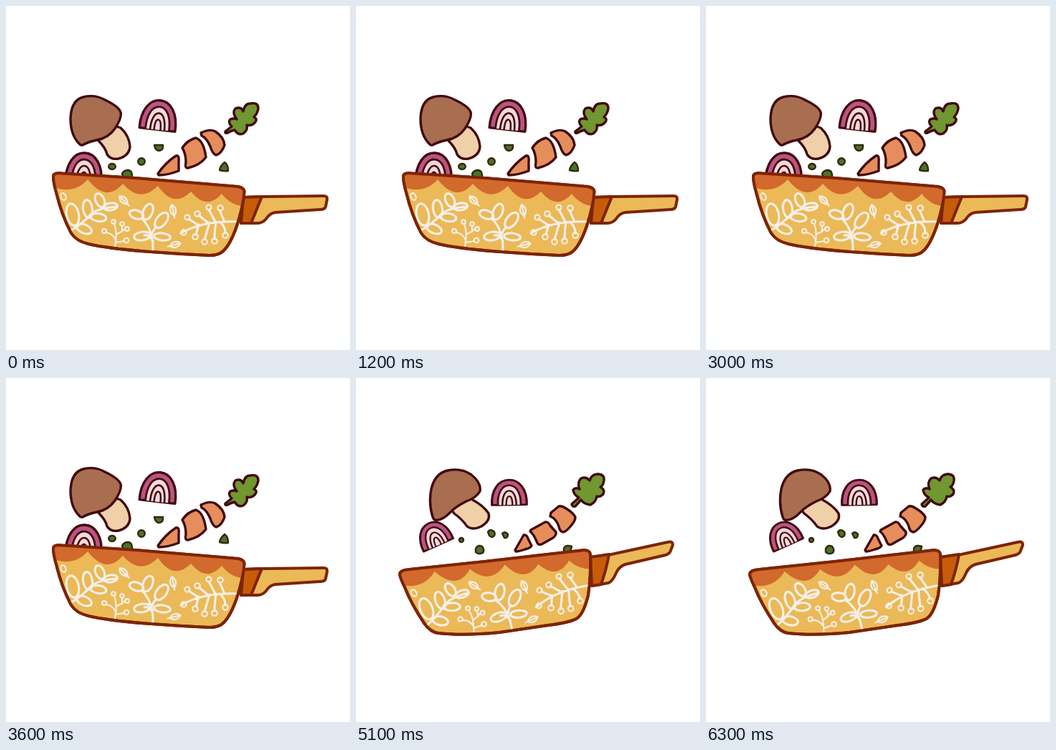
These frames come from a looping animation (480 by 480 pixels, 6.6 s). An HTML page:

```html
<!DOCTYPE html>
<html lang="en">
<head>
<meta charset="utf-8">
<title>Tossing vegetables</title>
<style>
  html, body { margin: 0; width: 100%; height: 100%; overflow: hidden; background: #fff; }
  svg { display: block; width: 100vw; height: 100vh; }
  .pose { animation: swap 600ms step-end infinite; }
  .up { animation-delay: -300ms; }
  @keyframes swap { 0% { opacity: 1; } 50%, 100% { opacity: 0; } }

  .food, .onion { stroke: #410b10; stroke-width: 3.4; stroke-linejoin: round; stroke-linecap: round; }
  .cap { fill: #a96e50; }
  .stem { fill: #efd0a9; }
  .carrot { fill: #e58e5c; }
  .leaf { fill: #709730; }
  .herb { fill: #467429; stroke: #35270f; stroke-width: 2.4; }
  .pan { fill: #ebb957; }
  .rim { fill: #d2692d; }
  .wedge { fill: #c65c09; }
  .line { fill: none; }
  .pan, .wedge, .line { stroke: #7d2407; stroke-width: 4; stroke-linejoin: round; }
  .deco { fill: none; stroke: #f5efe7; stroke-width: 3.1; stroke-linecap: round; stroke-linejoin: round; }
  .fine { stroke-width: 2.1; }
</style>
</head>
<body>
<svg viewBox="0 0 480 480" xmlns="http://www.w3.org/2000/svg">
  <defs>
    <path id="bodyDown" d="M66 238Q66 232 78 233.500L180 240L318 251.500Q332 252 332.500 259Q331 280 322 307Q313 333 303 342Q297 348 284 348Q240 346 195 342.500Q140 338 115 332Q98 328 91 317Q78 293 70 260Q66 246 66 238Z"/>
    <path id="bodyUp" d="M61 274Q61 268 75 267L180 256L311 241Q327 238 327 247Q328 275 324 303Q318 328 309 335Q300 341 268 345L200 355Q150 360 115 356Q104 355 95 342Q77 315 68 292Q62 280 61 274Z"/>
    <clipPath id="clipDown"><use href="#bodyDown"/></clipPath>
    <clipPath id="clipUp"><use href="#bodyUp"/></clipPath>

    <g id="onion" class="onion">
      <path fill="#bc5482" d="M-25 0C-26 -25 -15 -41 0 -41S26 -25 25 0Z"/>
      <path fill="#f6d8da" stroke-width="2.8" d="M-16.500 0C-17 -20 -10 -32 0 -32S17 -20 16.500 0"/>
      <path fill="#f6d8da" stroke-width="2.6" d="M-10 0C-10 -14 -6 -23 0 -23S10 -14 10 0"/>
      <path fill="#f6d8da" stroke-width="2.4" d="M-4.500 0C-4.500 -9 -3 -14 0 -14S4.500 -9 4.500 0"/>
    </g>

    <path id="rim" class="rim" d="M55 220H345V278Q318 284 301 262Q280 286 258 259Q234 283 212 251Q187 276 163 248Q140 275 114 242Q94 264 64 252Z"/>

    <g id="sprig" class="fine">
      <path d="M0 -8Q8 0 0 8Q-8 0 0 -8ZM0 -5V11"/>
    </g>

    <g id="deco" class="deco">
      <ellipse class="fine" cx="80" cy="266" rx="3.500" ry="5" transform="rotate(-20 80 266)"/>
      <!-- leafy branch -->
      <path d="M89 314Q106 305 120 289Q133 281 154 280"/>
      <ellipse cx="93" cy="291" rx="8.500" ry="15.500" transform="rotate(-12 93 291)"/>
      <ellipse cx="114" cy="283" rx="6.500" ry="12.500" transform="rotate(-8 114 283)"/>
      <ellipse cx="131" cy="271" rx="6" ry="10" transform="rotate(-24 131 271)"/>
      <ellipse cx="146" cy="280" rx="9.500" ry="5" transform="rotate(-8 146 280)"/>
      <ellipse cx="129" cy="295" rx="11" ry="5.500" transform="rotate(8 129 295)"/>
      <ellipse cx="109" cy="311" rx="11" ry="6" transform="rotate(22 109 311)"/>
      <use href="#sprig" transform="translate(164 271) rotate(-45)"/>
      <!-- small berries -->
      <path class="fine" d="M152 335Q156 317 151 304M140 316Q150 318 153 327M155 318L161 315L167 310M162 315L162 307M153 330L165 328"/>
      <g class="fine">
        <circle cx="137" cy="314" r="3"/>
        <circle cx="150" cy="301" r="2.800"/>
        <circle cx="162" cy="304" r="2.700"/>
        <circle cx="169" cy="311" r="2.900"/>
        <circle cx="168" cy="327" r="3.300"/>
      </g>
      <!-- centre plant -->
      <path d="M205 341Q206 313 190 297M204 318Q205 313 210 308M205 328Q199 318 193 320"/>
      <ellipse cx="198" cy="287" rx="6.500" ry="11.500" transform="rotate(22 198 287)"/>
      <ellipse cx="182" cy="291" rx="10" ry="5.800" transform="rotate(18 182 291)"/>
      <ellipse cx="217" cy="299" rx="7" ry="12.500" transform="rotate(38 217 299)"/>
      <ellipse cx="190" cy="321" rx="11.500" ry="5.800" transform="rotate(-8 190 321)"/>
      <ellipse cx="218" cy="322" rx="11.500" ry="5" transform="rotate(6 218 322)"/>
      <use href="#sprig" transform="translate(233 285) rotate(-12)"/>
      <use href="#sprig" transform="translate(236 333) rotate(76)"/>
      <!-- berry branch -->
      <path d="M326 301Q275 299 244 317M305 301L298 285M292 301L283 284M281 302L269 292M267 305L255 297M269 305L265 319M284 302L277 326M293 301Q291 315 291 325M298 301Q306 307 306 317"/>
      <g class="fine">
        <circle cx="299" cy="282" r="3.800"/>
        <circle cx="283" cy="281" r="3.500"/>
        <circle cx="267" cy="290" r="3.800"/>
        <circle cx="253" cy="295" r="3.600"/>
        <circle cx="248" cy="316" r="3.600"/>
        <circle cx="264" cy="322" r="3.800"/>
        <circle cx="277" cy="329" r="3.800"/>
        <circle cx="291" cy="328" r="3.800"/>
        <circle cx="306" cy="320" r="3.800"/>
      </g>
    </g>
  </defs>

  <g class="pose">
    <path class="food stem" d="M129 188Q139 198 141 207Q146 215 157 213Q172 209 173 196Q172 181 160 170L145 165Z"/>
    <path class="food cap" d="M102 192Q90 180 90 157Q91 131 108 127Q124 123 138 131Q157 140 160 148Q162 156 152 171Q143 184 127 187Q113 190 107 194Q104 195 102 192Z"/>
    <use href="#onion" transform="translate(211 172.500) rotate(6.500)"/>
    <use href="#onion" transform="translate(108 246) rotate(3)"/>
    <g class="food carrot">
      <path d="M212 234Q222 219 237 209Q242 207 241 218L241 230Q226 236 213 236Z"/>
      <path d="M246 198Q253 187 265 184Q276 188 279 211Q271 222 254 226Q249 227 251 218Q251 206 246 198Z"/>
      <path d="M272 177Q284 171 292 175Q304 183 305 194Q301 206 293 208Q288 206 285 196Q280 184 273 181Z"/>
    </g>
    <path class="food leaf" d="M306 175L315 168Q309 162 313 158Q318 156 322 158Q315 149 320 143Q328 140 331 147Q333 136 341 136Q352 134 352 143Q351 150 346 155Q352 158 347 163Q342 168 336 166Q338 173 331 178Q324 181 319 173Q314 174 309 177Q305 178 306 175Z"/>
    <g class="food herb">
      <path d="M207 194H219Q220 202 213 202Q208 201 207 194Z"/>
      <circle cx="189" cy="217" r="4.800"/>
      <ellipse cx="148" cy="224" rx="4.800" ry="4"/>
      <path d="M162 234Q164 229 171 229Q177 230 176 240H164Z"/>
      <path d="M305 218Q310 221 310 230Q304 231 298 229Q299 223 305 218Z"/>
    </g>
    <path class="pan" d="M331 267L360 266L443 265Q449 265 448 270L446 280Q445 284 438 284L376 288Q368 289 363 297Q358 303 351 303H328Z"/>
    <path class="wedge" d="M331 267L357 266Q350 283 342 303L328 303Z"/>
    <use class="pan" href="#bodyDown"/>
    <g clip-path="url(#clipDown)">
      <use href="#rim"/>
      <use href="#deco"/>
    </g>
    <use class="line" href="#bodyDown"/>
  </g>

  <g class="pose up">
    <path class="food stem" d="M137 189Q148 197 155 207Q163 213 175 207Q188 199 185 189Q178 178 161 169L140 165L130 180Z"/>
    <path class="food cap" d="M107 194Q101 175 105 155Q110 133 128 129Q147 125 161 135Q175 146 173 158Q168 167 154 172Q138 180 131 188Q119 200 110 198Q108 197 107 194Z"/>
    <use href="#onion" transform="translate(214 177) rotate(-1) scale(.97 .85)"/>
    <use href="#onion" transform="translate(115 233) rotate(-24) scale(.9 .81)"/>
    <g class="food carrot">
      <path d="M222 240Q230 226 234 219Q238 218 240 224L245 234Q244 237 236 239Q228 242 223 242Z"/>
      <path d="M244 212L264 201Q268 200 271 206L279 215Q280 219 275 223L259 232Q254 234 252 228Q248 218 243 214Z"/>
      <path d="M272 188L283 179Q287 178 293 182Q303 188 306 194Q306 199 301 205Q293 215 289 215Q284 214 283 207Q279 196 271 193Z"/>
    </g>
    <path class="food leaf" d="M301 176L311 167Q303 162 303 156Q306 152 312 155Q308 146 314 140Q321 137 326 143Q328 135 337 134Q347 134 346 143Q345 150 341 152Q348 156 345 162Q340 167 336 165Q335 173 327 177Q318 176 314 170L306 179Q302 180 301 176Z"/>
    <g class="food herb">
      <circle cx="147" cy="226" r="3"/>
      <path d="M184 215Q186 211 191 213Q195 215 193 220Q190 224 186 220Z"/>
      <path d="M204 217Q208 213 212 218Q212 224 207 223Z"/>
      <path d="M167 238Q170 232 176 235Q180 240 177 244Q171 247 167 243Z"/>
      <path d="M290 238Q292 232 301 235L299 244H290Z"/>
    </g>
    <path class="pan" d="M327 250L352 247L435 229Q442 227 442 233L439 241Q438 245 432 247L376 260Q367 263 363 272Q358 284 352 286L329 290Z"/>
    <path class="wedge" d="M327 250L353 246Q350 265 342 288L329 290Z"/>
    <use class="pan" href="#bodyUp"/>
    <g clip-path="url(#clipUp)">
      <g transform="matrix(.983 -.186 .186 .983 -47.400 53.300)">
        <use href="#rim"/>
        <use href="#deco"/>
      </g>
    </g>
    <use class="line" href="#bodyUp"/>
  </g>
</svg>
</body>
</html>
```
